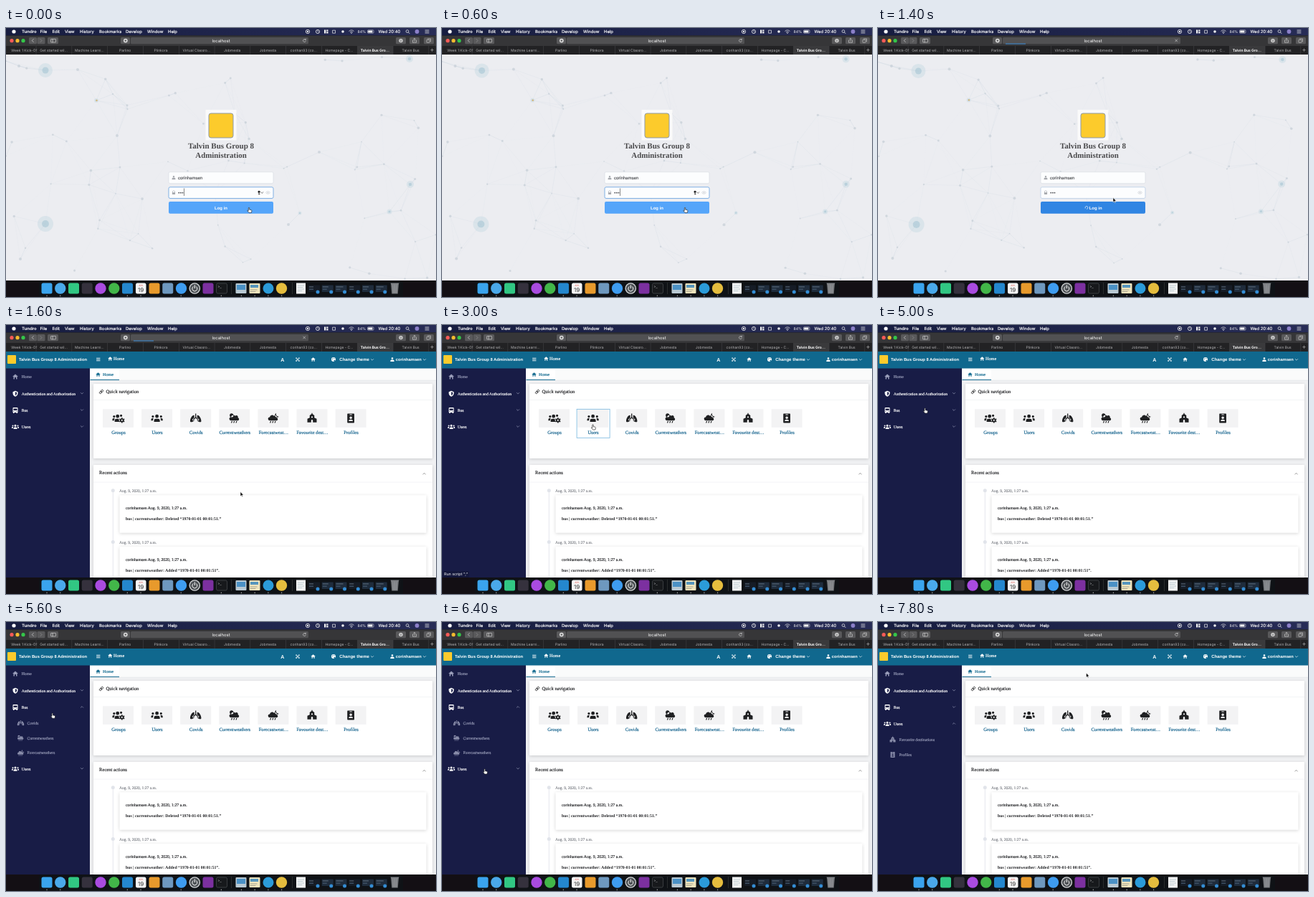
An HTML page for the animation above (8000 ms loop, 600 by 375 pixels).

```html
<!DOCTYPE html>
<html lang="en">
<head>
<meta charset="utf-8">
<title>Bus administration</title>
<style>
  html, body { margin: 0; width: 100%; height: 100%; overflow: hidden; background: #08090c; }
  svg { display: block; }
  text { font-family: "Liberation Sans", Arial, sans-serif; text-rendering: geometricPrecision; white-space: pre; }
  .ui { font-family: Inter, sans-serif; }
  .serif { font-family: "Liberation Serif", "Times New Roman", serif; }
  .b { font-weight: 700; }
  .mid { text-anchor: middle; }
  .strong { stroke-width: .18px; }
  .card { filter: drop-shadow(0 1px 2px rgba(0, 0, 0, .16)); }
</style>
</head>
<body>
<svg id="stage" width="100%" height="100%" viewBox="0 0 600 375"></svg>
<script>
const LOOP = 8000, STEP = 200;
const USER = 'corinhamsen', SITE = 'Talvin Bus Group 8';
const TEAL = '#10688e', INK = '#28292c';

// ---------- drawing helpers ----------
const rect = (x, y, w, h, fill, r = 0, extra = '') =>
  `<rect x="${x}" y="${y}" width="${w}" height="${h}" rx="${r}" fill="${fill}" ${extra}/>`;
const circle = (x, y, r, fill, extra = '') =>
  `<circle cx="${x}" cy="${y}" r="${r}" fill="${fill}" ${extra}/>`;
const text = (x, y, s, size, fill, cls = '') =>
  `<text x="${x}" y="${y}" font-size="${size}" fill="${fill}" class="${cls}"` +
  `${cls.includes('strong') ? ` stroke="${fill}"` : ''}>${s}</text>`;
const line = (d, color, width = 0.7, extra = '') =>
  `<path d="${d}" fill="none" stroke="${color}" stroke-width="${width}" stroke-linecap="round" ${extra}/>`;
const border = (color, width = 0.6) => `stroke="${color}" stroke-width="${width}"`;
const card = (x, y, w, h) => rect(x, y, w, h, '#fff', 1, 'class="card"');
const chevron = (x, y, up, color) => {
  const k = up ? -1 : 1;
  return line(`M${x - 1.7} ${y - 0.8 * k}l1.7 ${1.7 * k} 1.7 ${-1.7 * k}`, color, 0.6);
};

// ---------- icons, drawn on a 16 unit grid around the origin ----------
const ball = (x, y, r) => `M${x - r} ${y}a${r} ${r} 0 1 0 ${2 * r} 0a${r} ${r} 0 1 0 ${-2 * r} 0Z`;
const cloud = 'M-6 4a3 3 0 0 1 0-6 4 4 0 0 1 7-2 3 3 0 0 1 5 3 2.6 2.6 0 0 1 0 5Z' +
  'M-5 5h1.5l-1 3h-1.5ZM-1 5h1.5l-1 3h-1.5ZM3 5h1.5l-1 3h-1.5Z';
const icons = {
  home: 'M-8 0L0-7 8 0H5V7H2V2H-2V7H-5V0Z',
  user: ball(0, -4, 3.6) + 'M-7 8V5a4 4 0 0 1 4-4h6a4 4 0 0 1 4 4v3Z',
  users: ball(0, -3.5, 3) + 'M-5 6V4a3 3 0 0 1 3-3h4a3 3 0 0 1 3 3v2Z' +
    ball(-7, -3, 2) + ball(7, -3, 2) +
    'M-10 4V2a2 2 0 0 1 2-2h2l-1 4ZM10 4V2a2 2 0 0 0-2-2h-2l1 4Z',
  groups: ball(-1, -3.5, 3) + 'M-6 6V4a3 3 0 0 1 3-3h4l1 5Z' + ball(-7, -3, 2) + ball(5, -4.5, 2) +
    'M-10 4V2a2 2 0 0 1 2-2h2l-1 4Z' +
    'M5.5-1h2v1.4l1.5.7 1.2-.8 1 1.7-1.2.8v1.4l1.2.8-1 1.7-1.2-.7-1.5.8V8h-2V6.8L4 6l-1.2.7-1-1.7L3 4.2V2.8L1.8 2l1-1.7L4 1.1l1.5-.7Z' +
    ball(6.5, 3.5, 1.3),
  lungs: 'M-.8-8h1.6v6l4 4-1 1.2L0-.4-3.8 3.2l-1-1.2 4-4Z' +
    'M-2.5-5c-3-1-7 5-7 10 0 3 5 1 7-1V2.8l-2 1.4-1.5-2 3.5-3ZM2.5-5c3-1 7 5 7 10 0 3-5 1-7-1V2.8l2 1.4 1.5-2-3.5-3Z',
  sunRain: ball(-5, -5, 3.2) + cloud,
  moonRain: 'M5-9a4 4 0 1 0 5 6 4.5 4.5 0 0 1-5-6Z' + cloud,
  castle: 'M-8 7V1l4-2v-4l3.3-2.5V-9H.7v1.5L4-5v4l4 2V7H1.5V4a1.5 1.5 0 0 0-3 0V7Z' + ball(0, -2, 1.3),
  badge: 'M-5-8H5a1 1 0 0 1 1 1V7a1 1 0 0 1-1 1H-5a1 1 0 0 1-1-1V-7a1 1 0 0 1 1-1ZM-2-6.8h4v1.2h-4Z' +
    ball(0, -1, 2.2) + 'M-3.5 5a3.5 3 0 0 1 7 0Z',
  shield: 'M0-8 7-5V-1C7 4 3 7 0 8-3 7-7 4-7-1V-5ZM0-5V5C2 4 4 2 4-1V-3.4Z',
  bus: 'M-7-6a2 2 0 0 1 2-2H5a2 2 0 0 1 2 2V5a1 1 0 0 1-1 1v2H3V6H-3V8H-6V6a1 1 0 0 1-1-1Z' +
    'M-5-5H5V0H-5Z' + ball(-4, 3, 1) + ball(4, 3, 1),
  palette: ball(0, 0, 7.5) + ball(-4, -1, 1.3) + ball(-1, -4.5, 1.3) + ball(3.5, -3, 1.3) + ball(3.5, 4, 2.4),
  expand: 'M-7-7h5l-5 5ZM7-7v5l-5-5ZM-7 7v-5l5 5ZM7 7h-5l5-5ZM-5-3l2-2 8 8-2 2ZM3-5l2 2-8 8-2-2Z',
  lock: 'M-6-1h1v-3a5 5 0 0 1 10 0v3h1v8H-6ZM-3-1h6v-3a3 3 0 0 0-6 0Z',
};
const icon = (name, x, y, size, fill) =>
  `<path transform="translate(${x} ${y}) scale(${size / 16})" d="${icons[name]}" fill="${fill}" fill-rule="evenodd"/>`;

// ---------- timing ----------
const ease = (t, start, length) => {
  const p = Math.min(1, Math.max(0, (t - start) / length));
  return p * p * (3 - 2 * p);
};
const pointerPath = [
  [0, 339, 250.5], [700, 339, 250.5], [1400, 328, 236.5], [1600, 327, 232.5], [2000, 326, 231],
  [2900, 210.5, 139], [3500, 210.5, 139], [4100, 157, 136], [4900, 65.5, 116], [5400, 65.5, 116],
  [6300, 59.5, 205], [6800, 59.5, 205], [7700, 290.5, 71],
];
function pointerAt(t) {
  const i = pointerPath.findLastIndex(k => k[0] <= t);
  const [t0, x0, y0] = pointerPath[i], [t1, x1, y1] = pointerPath[i + 1] || [LOOP, x0, y0];
  const p = ease(t, t0, t1 - t0);
  return { x: x0 + (x1 - x0) * p, y: y0 + (y1 - y0) * p };
}
const LOGIN_CLICK = 800, LOGGED_IN = 1600, BUS_CLICK = 5200, USERS_CLICK = 6600;

// ---------- browser window ----------
const tabs = ['Week 1 Kick-Of', 'Get started wil...', 'Machine Learni...', 'Parlino', 'Plinkora',
  'Virtual Classro...', 'Jobmesta', 'Jobmesta', 'corihan93 (co...', 'Homepage - C...', 'Talvin Bus Gro...', 'Talvin Bus'];
const menus = { File: 47.5, Edit: 64.5, View: 82, History: 103, Bookmarks: 130, Develop: 167, Window: 197, Help: 226 };

function menuBar() {
  let s = '<linearGradient id="bar"><stop stop-color="#171d40"/><stop offset="1" stop-color="#272c56"/></linearGradient>' +
    rect(0, 0, 600, 10.5, 'url(#bar)') + circle(11, 5, 2.6, '#fff') + text(22, 7.2, 'Tundro', 6, '#fff', 'ui b');
  for (const name in menus) s += text(menus[name], 7.2, name, 5.9, '#fff', 'ui strong');
  const w = '#f2f2f2';
  s += circle(421, 5, 2.7, 'none', border(w, 0.8)) + circle(421, 5, 1.2, w) +
    circle(435, 5, 2.6, 'none', border(w, 0.8)) + line('M435 3.4V5l1.3.8', w, 0.6) +
    rect(444, 2.5, 2.3, 5, w) + rect(447.2, 2.5, 2.3, 2, w) + rect(447.2, 5.2, 2.3, 2.3, w) +
    line('M456 3.2h3.5v4h-3.5Z', w) + circle(470, 5, 1.8, w) +
    line('M478.8 4.2q3.2-2.8 6.4 0M480.3 5.7q1.7-1.4 3.4 0', w) + circle(482, 7.2, 0.7, w) +
    text(490.5, 7, '84%', 5.2, w, 'ui') + rect(504.5, 2.8, 8.5, 4.4, 'none', 1, border(w, 0.5)) +
    rect(505.2, 3.5, 6.2, 3, w) + text(519.5, 7.2, 'Wed 20:40', 5.9, w, 'ui strong') +
    circle(560, 4.6, 1.9, 'none', border(w, 0.7)) + line('M561.5 6l1.6 1.7', w) +
    circle(573.5, 5, 2.9, '#8b7fc8') + line('M585 3h5M585 5h5M585 7h5', w);
  return s;
}

function toolbar(t) {
  const loading = t >= LOGIN_CLICK && t < 2200, w = '#d8d8d8', button = '#59595b';
  let s = rect(0, 10.5, 600, 14.5, '#363638');
  ['#fc5b57', '#f5bc2f', '#34c749'].forEach((c, i) => s += circle(8 + 8 * i, 17.7, 2.6, c));
  [[32, 11], [43.5, 11], [58, 15], [160, 13], [544, 14], [563, 14], [583, 14]].forEach(([x, width]) =>
    s += rect(x, 13, width, 9.3, button, 1.5));
  s += line('M38.3 15.6l-2 2 2 2', w) + line('M48 15.6l2 2-2 2', '#929294') +
    rect(62.5, 15.5, 7, 4.5, 'none', 0.5, border(w)) + line('M65 15.6v4.3', w) +
    circle(166.8, 17.6, 2.9, w) + circle(166.8, 17.6, 1.2, button) +
    rect(174, 13, 248, 9.3, '#515153', 1.5) + text(300, 19.7, 'localhost', 5.9, '#fff', 'ui mid') +
    circle(551, 17.6, 2.7, w) + line('M551 16.2v2.6M549.8 17.7l1.2 1.2 1.2-1.2', button, 0.6) +
    line('M568 17h-.5v3.3h5V17H572M570 18.5v-4M568.8 15.7l1.2-1.2 1.2 1.2', w, 0.6) +
    rect(587, 16.3, 4, 4, 'none', 0.5, border(w)) + line('M588.5 15h4v4', w, 0.6);
  if (loading) {
    const width = 28 * ease(t, LOGIN_CLICK - 200, 600) + 216 * ease(t, 1600, 600);
    s += line('M414.7 16l3 3M417.7 16l-3 3', w, 0.6) + rect(178, 21.6, width, 0.9, '#3a94e8');
  } else {
    s += line('M418.1 16.3a2 2 0 1 0 .3 1.9M418.3 15v1.5h-1.5', w, 0.6);
  }
  s += rect(0, 25, 600, 12, '#222224');
  tabs.forEach((name, i) => {
    const left = i * 49.8 - 8, active = i === 10;
    if (active) s += rect(490, 25, 50, 12, '#3a3a3c');
    s += text(left + 24.8 + (i ? 0 : 8.5), 32.5, name, 5, active ? '#fff' : '#b4b4b6', 'ui mid' + (active ? ' b' : '')) +
      rect(left + 49.8, 25, 0.5, 12, '#47474a');
  });
  return s + line('M592.7 30.7h3.6M594.5 28.9v3.6', '#bbb', 0.6);
}

const dockApps = [['#3aa4ee'], ['#4aa9ea', 1], ['#31c783'], ['#35313d'], ['#a94be0', 1], ['#42b649', 1], ['#2487ce'], 0,
  ['#e89a2c'], ['#6e98bf'], ['#3e9cf0', 1], 0, ['#7c30a0'], 0];
function dock() {
  let s = rect(0, 352, 600, 23, '#130f14') + rect(46, 352.5, 508, 24, '#0f1216', 3);
  const app = (x, [color, round]) => round ? circle(x, 363, 7.7, color) : rect(x - 7.5, 355.5, 15, 15, color, 2.5);
  dockApps.forEach((a, i) => { if (a) s += app(57 + i * 18.75, a); });
  s += rect(181, 355.5, 14.5, 15, '#f6f6f6', 2.5) + text(188.2, 360, 'JUL', 3.5, '#e14b42', 'ui mid') +
    text(188.2, 368.2, '19', 8, '#333', 'ui mid') +
    circle(263.3, 363, 7.8, '#d5d7d9') + circle(263.3, 363, 6.5, '#4d5155') +
    line('M261 360.7a3.5 3.5 0 1 0 4.6 0M263.3 358.8v3.8', '#fff', 1) +
    rect(293.5, 356, 15, 14, '#17191c', 2, border('#55585b')) + text(295.5, 361.5, '&gt;_', 4.5, '#ddd') +
    rect(314.5, 355, 0.5, 16, '#444') + rect(399, 355, 0.5, 16, '#444') +
    rect(320.5, 356, 15, 14, '#b9c9d3', 1) + rect(322, 358, 12, 7, '#4b91c6') +
    rect(339.5, 356, 15, 14, '#eee4bd', 1) + rect(341, 358, 11, 4, '#5696be') + line('M341 365h9M341 367.5h7', '#8b8a80') +
    circle(366, 363, 7.5, '#2b9bd9') + circle(384.5, 363, 7.7, '#e5bd3e') +
    rect(405, 355.5, 13, 15, '#f3f4f4') + line('M407 359h9M407 361.5h7M407 364h9M407 366.5h6', '#8da6b2', 0.5);
  for (let i = 0; i < 6; i++) {
    const x = 422 + i * 18.75;
    s += rect(x, 358.5, 16, 9.5, i % 3 ? '#1f2c3c' : '#161c26', 0.5) +
      rect(x + 1, 360.5, 6 + i % 3 * 2, 0.8, '#6f7e8d') + rect(x + 1, 363.5, 6, 1.5, '#3c4f63') + circle(x + 13, 368, 2.5, '#348dd4');
  }
  s += '<path d="M537 356h11l-1.3 14.5h-8.4Z" fill="#777a7e"/>' + line('M537 356h11M540 358l.6 11M542.5 358v11M545 358l-.6 11', '#b8bbbe', 0.5);
  [0, 1, 6, 7, 10, 13, 14.5, 15.5, 16.5, 17.5].forEach(i => s += circle(57 + i * 18.72, 373.3, 0.7, '#bbb'));
  return s;
}

// ---------- login page ----------
const bigDots = [[55, 59, 10], [126, 101, 3], [564, 218, 5], [55, 273, 11], [535, 256, 3.5], [410, 258, 2.5],
  [563, 43, 5], [18, 53, 2], [100, 58, 2], [437, 173, 2], [394, 274, 2], [20, 322, 2], [155, 150, 2]];
let seed = 11;
const random = () => (seed = seed * 16807 % 2147483647) / 2147483647;
const dots = bigDots.concat(Array.from({ length: 62 }, () => [random() * 600, 40 + random() * 310, 0.7 + random() * 1.2]));

function network(t) {
  const drift = (i, time) => 3 * (Math.sin(time / 3000 + i) - Math.sin(i));
  const now = dots.map(([x, y, r], i) => [x + drift(i, t), y + drift(2 * i, t) * 0.7, r]);
  let s = '';
  now.forEach(([x, y, r], i) => {
    for (const [x2, y2] of now.slice(i + 1)) {
      const d = Math.hypot(x - x2, y - y2);
      if (d < 72) s += line(`M${x} ${y}L${x2} ${y2}`, '#bccbd7', 0.5, `opacity="${0.6 * (1 - d / 80)}"`);
    }
    s += r > 2.2 ? circle(x, y, r, '#bdd4df', 'opacity=".38"') + circle(x, y, r * 0.45, '#a3c2d1', 'opacity=".55"')
      : circle(x, y, r, '#cbd2da', 'opacity=".8"');
  });
  return s + circle(now[1][0] + 0.5, now[1][1], 1.2, '#d8b878');
}

function loginPage(t, pointer) {
  const sent = t >= LOGIN_CLICK, hover = pointer.y > 242;
  let s = rect(0, 37, 600, 315, '#ecedf1') + network(t) +
    rect(278.5, 114, 43, 42.5, '#fafafa') + rect(283, 119, 34, 34, '#fccb2c', 3, border('#8d99a5', 1)) +
    text(300, 168, SITE, 11, '#4b4b4d', 'serif b mid') + text(300, 181.2, 'Administration', 10.9, '#4b4b4d', 'serif b mid') +
    rect(227, 200.7, 146, 16, '#fcfdfe', 2, border('#d6dae1')) +
    rect(227, 221.8, 146, 15.7, '#fcfdfe', 2, border(sent ? '#b9cde6' : '#629fe0', 0.8)) +
    icon('user', 234, 208.5, 5.5, '#a6a9ae') + icon('lock', 234, 229.5, 5.5, '#a6a9ae') +
    text(240, 210.8, USER, 6, '#56585c', 'strong');
  for (let i = 0; i < 3; i++) s += circle(241.3 + 2.6 * i, 229.7, 0.9, '#4d4f53');
  s += '<ellipse cx="365.5" cy="229.5" rx="2.7" ry="1.7" fill="none" stroke="#c0c4cc" stroke-width=".6"/>' + circle(365.5, 229.5, 0.8, '#c0c4cc');
  if (!sent) {
    s += rect(248, 223.5, 0.7, 10.5, '#555') + circle(353, 228.2, 1.5, '#222') +
      line('M353 229v3M353 231.5h1', '#222', 0.8) + chevron(357.2, 229.5, false, '#222');
  }
  s += rect(227, 242, 146, 16.7, sent ? '#3085e3' : hover ? '#55a5fa' : '#409eff', 2) +
    text(sent ? 303.7 : 300, 252.6, 'Log in', 6, '#fff', 'b mid');
  if (sent) s += line('M291 248.5a2 2 0 1 1-2 2', '#fff', 0.6, `transform="rotate(${t * 0.18} 291 250.5)"`);
  return s;
}

// ---------- dashboard ----------
const tiles = [['groups', 'Groups'], ['users', 'Users'], ['lungs', 'Covids'], ['sunRain', 'Currentweathers'],
  ['moonRain', 'Forecastweat…'], ['castle', 'Favourite dest…'], ['badge', 'Profiles']];
const tileX = i => 156.5 + 54.1 * i;
const tileUnder = p => p.y > 117 && p.y < 158 ? tiles.findIndex((_, i) => Math.abs(p.x - tileX(i)) < 23) : -1;

function submenu(y, items, open) {
  if (open <= 0) return '';
  const rows = items.map(([name, label], i) =>
    icon(name, 20.5, 10.6 + 20.9 * i, 8, '#888ca9') +
    text(29.5, 12.4 + 20.9 * i, label, 5.6, '#9498b4', 'serif strong')).join('');
  return `<svg x="0" y="${y}" width="117" height="${20.9 * items.length * open}" overflow="hidden">${rows}</svg>`;
}

function sidebar(t) {
  const users = ease(t, USERS_CLICK, 300), bus = ease(t, BUS_CLICK, 300) - users;
  const usersY = 142 + 62.7 * bus;
  const item = (name, label, y, open) => icon(name, 13, y, 8, '#fff') +
    text(21.7, y + 1.9, label, 5.65, '#fff', 'serif strong') + chevron(106, y - 0.5, open, '#a5a9c4');
  return rect(0, 60, 117, 292, '#181c46') + icon('home', 13, 72, 8, '#989cb8') +
    text(21.7, 74, 'Home', 5.8, '#989cb8', 'serif strong') +
    item('shield', 'Authentication and Authorization', 95.7, false) + item('bus', 'Bus', 119, bus > 0.5) +
    submenu(130.3, [['lungs', 'Covids'], ['sunRain', 'Currentweathers'], ['moonRain', 'Forecastweathers']], bus) +
    item('users', 'Users', usersY, users > 0.5) +
    submenu(usersY + 11.5, [['castle', 'Favourite destinations'], ['badge', 'Profiles']], users);
}

function header() {
  return rect(0, 37, 600, 23.5, TEAL) + rect(2, 42, 12, 12, '#fccb2c', 1) +
    text(18, 50.2, SITE + ' Administration', 5.8, '#fff', 'b') +
    line('M126.5 46.2h4.5M126.5 48h4.5M126.5 49.8h4.5', '#fff', 0.8) +
    icon('home', 145.3, 47, 6.2, '#fff') + text(150, 49.3, 'Home', 6.2, '#fff', 'serif strong') +
    text(385.7, 50.8, 'A', 7, '#fff', 'b mid') + icon('expand', 407, 48, 6, '#fff') + icon('home', 428.6, 48, 6.5, '#fff') +
    icon('palette', 457, 48, 6.5, '#fff') + text(465.3, 50.3, 'Change theme', 6.05, '#fff', 'b') + chevron(511, 48.3, false, '#fff') +
    icon('user', 539, 48, 6, '#fff') + text(543.8, 50.3, USER, 5.8, '#fff', 'b') + chevron(584, 48.3, false, '#fff');
}

function action(y, message) {
  const date = 'Aug. 9, 2020, 1:27 a.m.';
  return circle(149.3, y, 2.5, '#e1e4ea') + text(158, y + 2, date, 5.5, '#85888e', 'serif strong') + card(158.5, y + 6.5, 428, 52.5) +
    text(167, y + 26, `${USER} ${date}`, 5.8, INK, 'serif strong') +
    text(167, y + 41, `bus | currentweather: ${message}`, 5.87, '#1e1f22', 'serif b');
}

function dashboard(t, pointer) {
  const hovered = tileUnder(pointer);
  let s = rect(117, 60, 483, 292, '#f0f1f3') + rect(117, 60, 483, 17, '#fafbfb') + rect(117, 76.8, 483, 0.5, '#d9dde2') +
    rect(119, 61, 39, 15.5, '#fff') + rect(117.5, 75.9, 40.5, 1, TEAL) +
    icon('home', 128.5, 69, 6.5, TEAL) + text(135, 71.2, 'Home', 6.1, TEAL, 'serif strong') +
    card(122, 82, 473, 104) + rect(122, 104, 473, 0.5, '#e6e8ed') +
    '<g transform="translate(133 93) rotate(-45)">' +
    rect(-3.2, -1.2, 3.8, 2.4, 'none', 1.2, border(INK, 0.9)) + rect(-0.6, -1.2, 3.8, 2.4, 'none', 1.2, border(INK, 0.9)) + '</g>' +
    text(139.5, 95.2, 'Quick navigation', 6.65, INK, 'serif strong');
  tiles.forEach(([name, label], i) => {
    const x = tileX(i);
    s += rect(x - 21.5, 117.3, 43, 25.5, '#f3f3f4') + icon(name, x, 130, 13, '#1f2022') +
      text(x + 0.5, 152.4, label, 6.6, '#12618c', 'serif mid strong');
    if (i === hovered) s += rect(x - 22.5, 117.3, 46, 40, 'none', 0, border('#75b5de', 0.8));
  });
  s += card(122, 195, 473, 170) + text(130, 208.3, 'Recent actions', 6.65, INK, 'serif strong') + chevron(583.5, 207.3, true, '#555') +
    rect(122, 218.8, 473, 0.5, '#e6e8ed') + rect(148.8, 231, 1, 121, '#e4e7ed') +
    action(230.7, 'Deleted “1970-01-01 00:01:51.”') + action(302.5, 'Added “1970-01-01 00:01:51”.') +
    sidebar(t) + header();
  if (hovered >= 0) s += rect(0, 343, 38, 9, '#14183c', 1) + text(3, 349.2, 'Run script ";"', 5.3, '#fff', 'ui');
  return s;
}

// ---------- pointer ----------
function pointerShape(p, hand) {
  const d = hand
    ? 'M-.7.5a.7.7 0 0 1 1.4 0V2.7l2.4.5q1 .3.8 1.5L3.3 7H0L-2.2 4.2q.2-1.1 1.5.1Z'
    : 'M0 0V6.2L1.5 4.9 2.5 7 3.4 6.6 2.5 4.6H4.4Z';
  const paint = hand ? 'fill="#fff" stroke="#111"' : 'fill="#000" stroke="#fff"';
  return `<path transform="translate(${p.x} ${p.y})" d="${d}" ${paint} stroke-width=".6" stroke-linejoin="round"/>`;
}

function picture(t) {
  const pointer = pointerAt(t), loggedIn = t >= LOGGED_IN;
  const hand = loggedIn ? pointer.x < 117 || tileUnder(pointer) >= 0 : pointer.y > 242 && t < LOGIN_CLICK;
  return (loggedIn ? dashboard : loginPage)(t, pointer) + menuBar() + toolbar(t) + dock() + pointerShape(pointer, hand);
}

const stage = document.getElementById('stage');
const begin = performance.now();
let shown = -1;
function tick() {
  const t = Math.floor((performance.now() - begin) % LOOP / STEP) * STEP;
  if (t !== shown) stage.innerHTML = picture(shown = t);
  requestAnimationFrame(tick);
}
tick();
</script>
</body>
</html>
```
